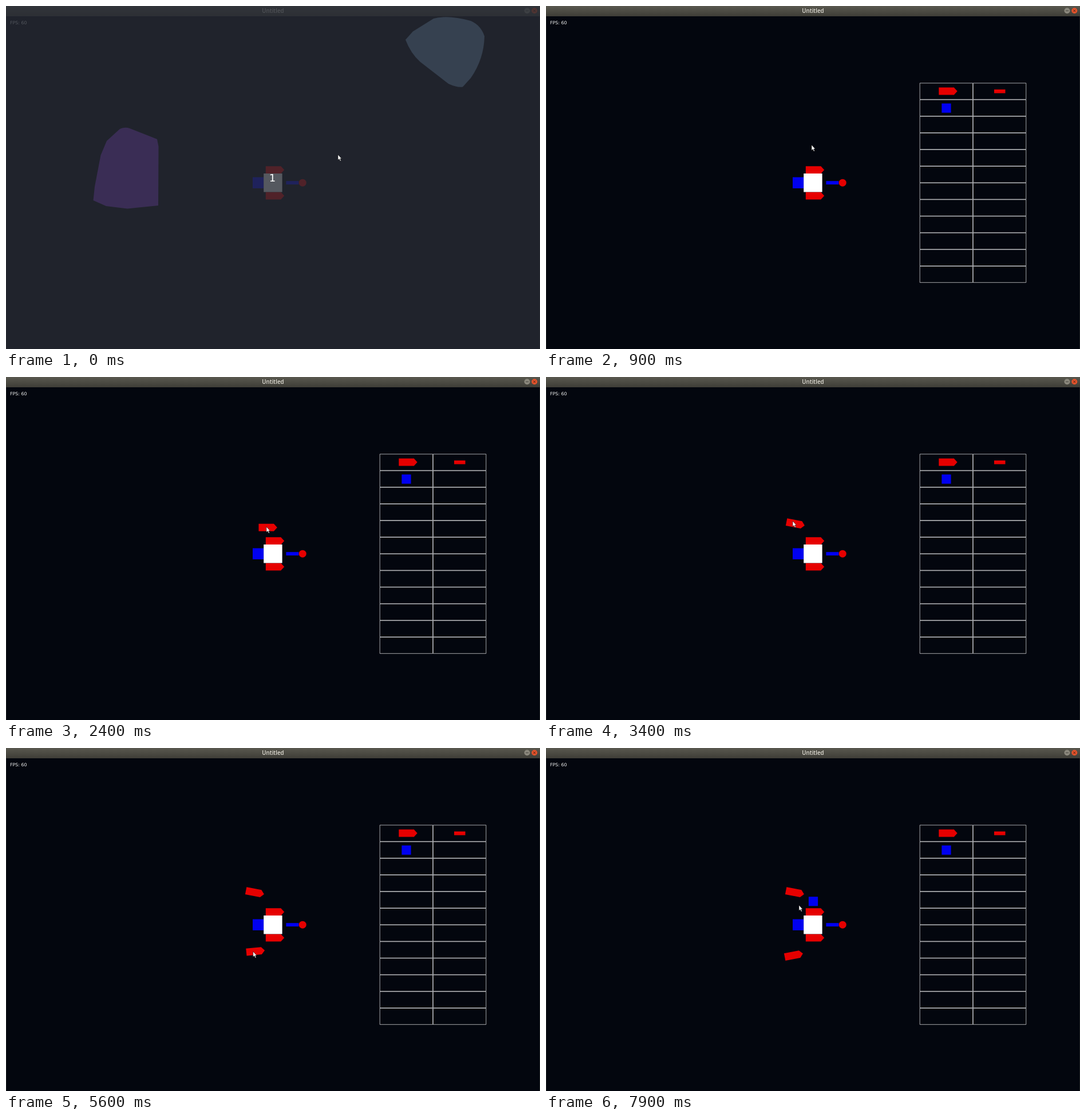
Animation, 933 px wide and 600 px high, one loop 8 s. Source, as an HTML page:

```html
<!DOCTYPE html>
<html lang="en">
<head>
<meta charset="utf-8">
<title>Ship builder</title>
<style>
  html, body { margin: 0; width: 100%; height: 100%; overflow: hidden; background: #03060e; }
  svg { display: block; width: 933px; height: 600px; }
  .red { fill: #e60000; }
  .blue { fill: #0000f0; }
  .title { font: 600 9.8px "Open Sans", sans-serif; fill: #e2dfd6; text-anchor: middle; }
  .fps { font: 7.9px "DejaVu Sans", sans-serif; fill: #f4f4f4; }
  .count { font: 18px "DejaVu Sans", sans-serif; fill: #fff; text-anchor: middle; }
</style>
</head>
<body>
<svg viewBox="0 0 933 600">
  <defs>
    <linearGradient id="bar" x2="0" y2="1">
      <stop offset="0" stop-color="#59584f"/>
      <stop offset="1" stop-color="#3e3d37"/>
    </linearGradient>
    <path id="thruster" class="red" d="M-16.2-6.5H10.3L16.2 0L10.3 6.5H-16.2Z"/>
    <rect id="block" class="blue" x="-8.1" y="-8.1" width="16.2" height="16.2"/>
  </defs>

  <rect width="933" height="600" fill="#03060e"/>
  <path d="M.5 18V600M932.5 18V600" stroke="#1c1f22"/>
  <rect width="933" height="18" fill="url(#bar)"/>
  <text class="title" x="466.5" y="11.5">Untitled</text>
  <circle cx="910.5" cy="8.3" r="5" fill="#8b887d"/>
  <path d="M908 8.3h5" stroke="#45443d"/>
  <circle cx="923.3" cy="8.3" r="5" fill="#e2532c"/>
  <path d="M921.4 6.4l3.8 3.8m0-3.8l-3.8 3.8" stroke="#4f2113"/>
  <text class="fps" id="fps" x="7" y="32.3">FPS: 60</text>

  <g id="rocks">
    <path fill="#8236d0" d="M152.5 340L155 316L165.5 261L176 236L199 215Q208 211 216 214L264 233L266.5 246L266 349L212 354.5L175 350Z"/>
    <path fill="#6c91b8" d="M698 59L711 44.5L747 22Q772 15 812 26Q830 34 836 53Q835 93 812 126L798 141.5Q788 143 773 136L724 98Q707 83 698 59Z"/>
  </g>

  <g id="ship">
    <use href="#thruster" x="470" y="286.8"/>
    <use href="#thruster" x="470" y="331.9"/>
    <rect class="blue" x="431" y="299.5" width="19.5" height="19.4"/>
    <rect x="450.2" y="293" width="32.4" height="32.4" fill="#fff"/>
    <rect class="blue" x="489.4" y="306.2" width="22" height="6"/>
    <circle class="red" cx="518.2" cy="309.2" r="6.5"/>
  </g>

  <g id="panel">
    <path id="grid" fill="none" stroke="#fff" stroke-width=".65"/>
    <use href="#thruster" x="702.5" y="149"/>
    <rect class="red" x="783" y="146" width="19.5" height="6.5"/>
    <use href="#block" x="699.5" y="178.6"/>
  </g>

  <use id="top" href="#thruster"/>
  <use id="bottom" href="#thruster"/>
  <use id="cube" href="#block" x="467" y="268.3"/>

  <g id="veil">
    <rect width="933" height="600" fill="#282c34" opacity=".79"/>
    <text class="count" x="465.5" y="306.5">1</text>
  </g>
  <path id="cursor" fill="#fff" stroke="#000" stroke-width=".5"
    d="M0 0V9.6L2.2 7.6L3.9 11.3L5.4 10.6L3.8 7.1H6.4Z"/>
</svg>

<script>
const LOOP = 8000, STEP = 100;
const GRIP = { x: 4, y: 0.6 };
const el = id => document.getElementById(id);
const clamp = v => Math.max(0, Math.min(1, v));
const progress = (t, from, to) => clamp((t - from) / (to - from));
const ease = p => p * p * (3 - 2 * p);

// Pointer moves: start, end, and where it comes to rest
const moves = [
  [400, 900, 464, 243],
  [900, 1300, 696, 144],
  [1400, 1900, 442, 268],
  [1900, 2400, 455, 262],
  [2400, 3100, 433, 260],
  [3200, 3400, 431, 252],
  [3700, 3900, 608, 187],
  [4000, 4200, 741, 157],
  [4300, 4500, 607, 228],
  [4500, 4600, 546, 299],
  [4600, 4800, 450, 374],
  [4800, 5500, 432, 355],
  [5500, 6100, 428, 367],
  [6800, 6900, 429, 362],
  [6900, 7100, 741, 162],
  [7200, 7500, 699, 184],
  [7800, 7900, 442, 275]
];

function pointer(t) {
  let x = 580, y = 260;
  for (const [from, to, endX, endY] of moves) {
    const p = ease(progress(t, from, to));
    x += (endX - x) * p;
    y += (endY - y) * p;
  }
  return { x, y };
}

function show(id, on) {
  el(id).style.display = on ? "" : "none";
}

function place(id, x, y, angle = 0) {
  el(id).setAttribute("transform", `translate(${x} ${y}) rotate(${angle})`);
}

// A held part trails the pointer by one step until it is dropped.
function drag(id, t, start, drop, angle) {
  show(id, t >= start);
  const { x, y } = pointer(Math.min(t - STEP, drop));
  place(id, x + GRIP.x, y + GRIP.y, angle);
}

function cells(left, top, width, height) {
  let path = "";
  for (let i = 0; i < 24; i++) {
    const x = left + (i % 2) * width;
    const y = top + (i >> 1) * height;
    path += `M${x} ${y}h${width - 0.65}v${height - 0.65}h${0.65 - width}Z`;
  }
  return path;
}

function draw(t) {
  show("veil", t < 100);
  show("rocks", t < 200);
  show("panel", t >= 200);
  show("cube", t >= 7900);
  el("fps").textContent = t >= 3900 && t < 4900 ? "FPS: 61" : "FPS: 60";
  drag("top", t, 1500, 3400, 11 * progress(t, 2500, 3100));
  drag("bottom", t, 4500, 6900, -11 * progress(t, 5300, 5900));
  const { x, y } = pointer(t);
  place("cursor", x, y);
}

el("grid").setAttribute("d", cells(653.2, 134.9, 93.1, 29.12));

const origin = performance.now();
function tick() {
  const t = (performance.now() - origin) % LOOP;
  draw(Math.floor(t / STEP) * STEP);
  requestAnimationFrame(tick);
}
draw(0);
requestAnimationFrame(tick);
</script>
</body>
</html>
```
